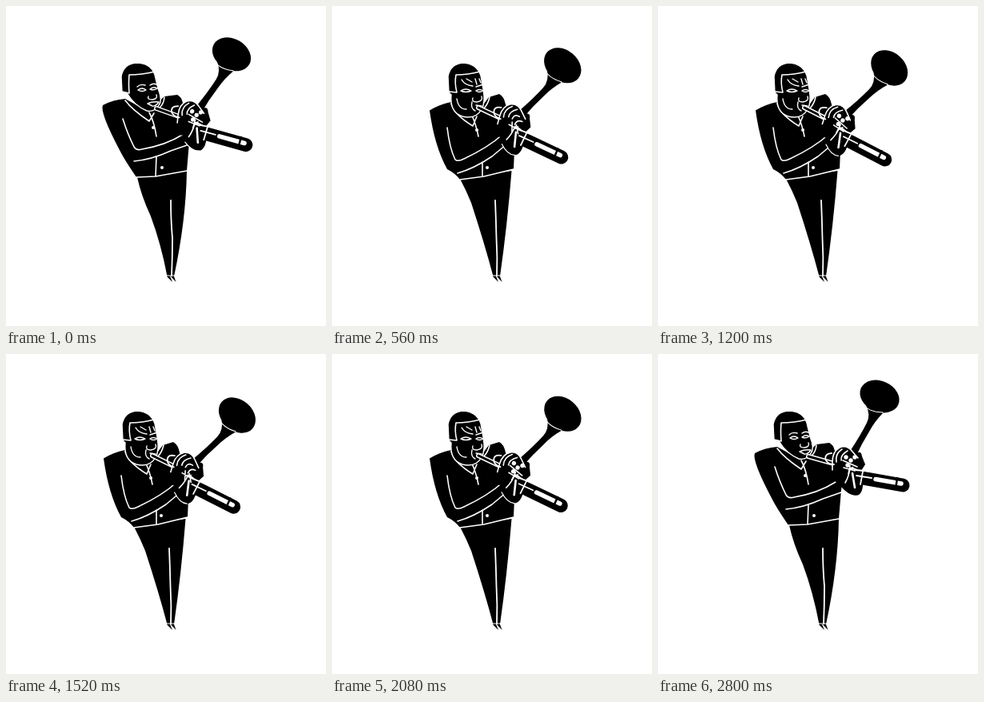
These frames come from a looping animation (400x400 px, 2.88 s). An HTML page with a canvas:

```html
<!DOCTYPE html>
<html lang="en">
<head>
<meta charset="utf-8">
<title>Trumpet player</title>
<style>
html, body { margin: 0; width: 100%; height: 100%; overflow: hidden; background: #fff; }
canvas { display: block; width: 400px; height: 400px; }
</style>
</head>
<body>
<canvas id="stage" width="400" height="400"></canvas>
<script>
const ctx = document.getElementById('stage').getContext('2d');
const LOOP = 2880, STEP = 80;

// Trumpet tilt in degrees over time
const tilts = [[0, 5.7], [80, 10], [160, 13], [240, 14.2], [560, 15.4], [880, 16.8], [1200, 17.4],
  [1760, 16.4], [2400, 15], [2560, 13], [2640, 9], [2720, 3], [2800, 0], [2880, 5.7]];

function tiltAt(t) {
  const i = tilts.findIndex(key => key[0] > t);
  const [t0, a] = tilts[i - 1], [t1, b] = tilts[i];
  return a + (b - a) * (t - t0) / (t1 - t0);
}

// Each body part: path at rest, path while blowing
const body = {
  legs: ['M164 214 Q169 237 181 263 Q194 298 201.5 338 L210 338 Q225 268 226 206 Z',
         'M160 216 Q168 231 174 246 Q191 298 201.5 338 L210 338 Q219 275 224.5 206 Z'],
  jacket: ['M121 124 Q134 117 149 116 L178 132 L198 113 L214 111 Q219 113 221 121 L233 150 L229 170 L226 206 L187 213 L163 214 Q148 192 143 182 Q117 133 121 124 Z',
           'M122 130.5 Q134 123 149 120 L178 138 L196 114 L209 110 Q215 113 217 123 L224 145 L228 180 L227 204 L190 213 L160 217 Q154 209 144 204 Q128 175 122 130.5 Z'],
  seams: ['M146 141 Q152 160 160 176 Q163 181 170 179 Q200 174 222 160 M160 194 Q182 192 206 181 L229 173 M149 118 Q158 130 179 144 L185 134 M179 133 Q185 144 188 163 M188 188 L187 213 M192 127 Q197 123 198 114 M163 214 L187 213 L226 206',
          'M144 152 Q147 178 154 192 Q157 195 165 191 Q195 177 214 160 M157 209 Q178 203 200 188 L218 173 M149 122 Q153 136 176 150 L181 138 M175 137 Q180 148 183 163 M188 195 L188 213 M189 129 Q195 123 197 114 M160 217 L190 213 L227 204'],
  inseam: ['M206 243 Q206 268 208 290 Q208 315 207 338', 'M204 243 Q205 268 205.5 290 Q207 315 206 338'],
  head: ['M145 108 L144 88 Q147 72 163 71 Q181 71 186 86 L190 103 Q196 118 191 124 Q186 133 176 131 Q160 124 152 110 Z',
         'M146 108 L145 88 Q148 72 164 71 Q181 72 186 87 L189 104 Q192 121 187 129 Q180 142 163 138 Q147 133 149 111 Z'],
  hairline: ['M145 107 L154 109 Q153 96 154 86 Q170 86 186 82', 'M146 107 L156 108 Q153 96 155 86 Q170 86 185 82']
};
const calmFace = 'M164 101 Q168 97 174 99 M180 99 Q184 96 188 98 M165 105 Q170 101 175 105 Q170 108 165 105 M180 104 Q184 100 189 103 Q185 106 180 104 M178 113 Q176 117 183 117 Q190 116 188 111 M177 122 Q183 119 191 120 Q187 126 183 125 Z';
const blowingFace = 'M162 92 Q166 99 176 100 M180 101 L189 98 M168 91 L175 95 M179 91 L181 98 M184 91 L186 96 M161 106 Q167 102 174 106 Q167 109 161 106 M180 106 Q184 103 189 106 Q184 109 180 106 M176 115 Q174 120 181 120 Q189 119 187 113 M156 116 Q158 129 168 129 M175 120 Q173 128 179 131 M180 124 L187 125';

function mix([a, b], u) {
  const goals = b.match(/[\d.]+/g);
  let i = 0;
  return a.replace(/[\d.]+/g, n => +n + (goals[i++] - n) * u);
}

function fill(d, color = '#000') {
  ctx.fillStyle = color;
  ctx.fill(new Path2D(d));
}

function line(d, width = 1.6, color = '#fff') {
  ctx.strokeStyle = color;
  ctx.lineWidth = width;
  ctx.stroke(new Path2D(d));
}

function oval(x, y, rx, ry, angle, color = '#000') {
  ctx.beginPath();
  ctx.ellipse(x, y, rx, ry, angle, 0, 7);
  ctx.fillStyle = color;
  ctx.fill();
}

function drawBody(u) {
  const part = name => mix(body[name], u);
  fill(part('legs'));
  line(part('inseam'), 1.8);
  fill('M201 338 L208 345 L205 338 Z M206 338 L212.5 345 L210 338 Z');
  line('M200 337 L211 337', 1.2);
  fill(part('jacket'));
  line(part('seams'));
  oval(184 - 3 * u, 152 + 3 * u, 2, 2, 0, '#fff');
  oval(195 - u, 202, 2, 2, 0, '#fff');
  fill(part('head'));
  // The outer outline shows only where the head overlaps the jacket
  line(part('head'), 1.4);
  line(part('hairline'));
  line(u > .5 ? blowingFace : calmFace, 1.4);
}

function drawTrumpet(pressed) {
  // Far hand and its fingers
  fill('M228 152 L256 158 Q257 174 249 177 Q240 179 230 168 Z');
  line('M230 168 Q240 179 249 177', 1.2);
  fill('M248 124 Q254 120 255 128 L259 138 L254 146 L244 142 Z');
  // Bell
  fill('M260 64 Q266 76 261 86 Q253 102 239 123 L247 129 Q254 113 264 97 Q271 84 281 74 Z');
  oval(277, 53, 25.5, 19.3, .42);
  line('M255 62 Q263 73 281 73', 1);
  // Slide
  line('M244 153 L306 164', 17, '#000');
  line('M272 156.5 L304 162', 5.5);
  line('M299 155 L297 169', 2.5, '#000');
  line('M246 145 L272 147 M248 152 L267 155 M256 147 L253 163', 1.8);
  line('M243 149 L246 167', 2.6);
  // Near hand
  fill('M218 135 Q218 122 227 117 Q236 113 243 122 L250 130 Q248 141 240 142 L234 160 L222 160 Z');
  line('M218 145 L218 135 Q218 122 227 117 Q236 113 243 122 L250 130 M240 142 Q239 152 234 161');
  line('M223 135 Q221 125 230 119 M229 133 Q228 126 237 121');
  line('M217 124 Q207 125 210 133 Q213 138 220 138', 1.8);
  if (pressed) {
    line('M234 134 Q235 127 242 129 M239 140 Q240 133 247 134 M232 142 L245 145 M235 138 L238 150 M241 140 L246 150');
  } else {
    for (const [x, y] of [[235, 129], [241, 133], [237, 139], [246, 129]]) oval(x, y, 2.7, 2.7, 0, '#fff');
    line('M231 133 L249 141 M232 142 L246 146 M240 139 L238 150');
  }
}

function draw(now) {
  const t = Math.floor(now % LOOP / STEP) * STEP;
  const tilt = tiltAt(t), turn = tilt * Math.PI / 180;
  const k = Math.min(1, Math.max(0, (tilt - 6) / 7)), u = k * k * (3 - 2 * k);
  const px = 190 - .36 * tilt, py = 128 - .29 * tilt;

  ctx.fillStyle = '#fff';
  ctx.fillRect(0, 0, 400, 400);
  ctx.lineCap = ctx.lineJoin = 'round';
  drawBody(u);

  // Lead pipe joins the lips to the turning trumpet
  const endX = px + 30 * Math.cos(turn) - 9 * Math.sin(turn);
  const endY = py + 30 * Math.sin(turn) + 9 * Math.cos(turn);
  const pipe = `M${188 - 5 * u} ${128 - u} L${endX} ${endY}`;
  line(pipe, 6);
  line(pipe, 3, '#000');

  ctx.save();
  ctx.translate(px, py);
  ctx.rotate(turn);
  ctx.translate(-190, -128);
  drawTrumpet(u > .5 && (t / STEP + 1) % 6 < 3);
  ctx.restore();
}

function loop() {
  draw(performance.now());
  requestAnimationFrame(loop);
}
loop();
</script>
</body>
</html>
```
